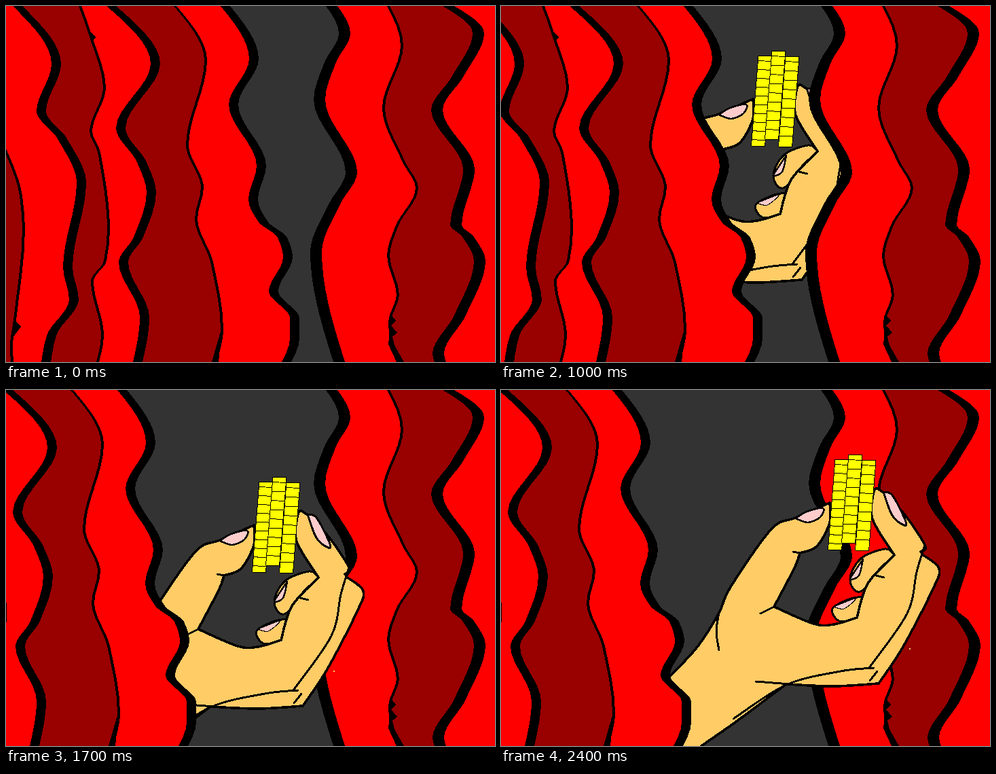
These frames come from a looping animation (720x524 px, 6 s). An HTML page:

```html
<!DOCTYPE html>
<html lang="en">
<head>
<meta charset="utf-8">
<title>Hand behind the curtain</title>
<style>
html, body { margin: 0; width: 100%; height: 100%; overflow: hidden; background: #333; }
svg { display: block; width: 100%; height: 100%; }
</style>
</head>
<body>
<svg id="stage" viewBox="0 0 720 524" shape-rendering="crispEdges"><g id="right"></g><g id="hand" stroke-linecap="round" stroke-linejoin="round"></g><g id="left"></g></svg>
<script>
const RED = '#f00', DARK = '#900', SKIN = '#fc6', PINK = '#fcc', YELLOW = '#ff0', BLACK = '#000';
const [stage, right, hand, left] = ['stage', 'right', 'hand', 'left'].map(id => document.getElementById(id));

function add(parent, d, fill, width = 0) {
  const p = document.createElementNS('http://www.w3.org/2000/svg', 'path');
  p.setAttribute('d', d);
  p.setAttribute('fill', fill || 'none');
  if (width) {
    p.setAttribute('stroke', BLACK);
    p.setAttribute('stroke-width', width);
  }
  parent.appendChild(p);
}

const points = text => text.split(',').map(s => s.trim().split(' ').map(Number));

// Smooth pen line through points
function curve(text) {
  const p = points(text);
  let d = 'M' + p[0];
  for (let i = 0; i < p.length - 1; i++) {
    const a = p[i - 1] || p[i], b = p[i], c = p[i + 1], e = p[i + 2] || c;
    const c1 = b.map((v, k) => v + (c[k] - a[k]) / 6);
    const c2 = c.map((v, k) => v - (e[k] - b[k]) / 6);
    d += 'C' + [c1, c2, c].join(' ');
  }
  return d;
}

// Hanging wave: x as a monotone spline of y, upright at every turning point
function wave(text, dx) {
  const p = points(text), n = p.length - 1;
  const s = p.slice(1).map(([x, y], i) => (x - p[i][0]) / (y - p[i][1]));
  const m = p.map((_, i) => s[i - 1] * s[i] > 0 ? 2 * s[i - 1] * s[i] / (s[i - 1] + s[i]) : 0);
  m[0] = 1.5 * s[0] - m[1] / 2;
  m[n] = 1.5 * s[n - 1] - m[n - 1] / 2;
  let d = `M${p[0][0] + dx} ${p[0][1]}`;
  for (let i = 0; i < n; i++) {
    const [x, y] = p[i], [X, Y] = p[i + 1], h = (Y - y) / 3;
    d += `C${x + dx + m[i] * h} ${y + h} ${X + dx - m[i + 1] * h} ${Y - h} ${X + dx} ${Y}`;
  }
  return d;
}

// Waves from the opening outwards: broad folds start red cloth, thin ones dark
function curtain(group, broad, waves) {
  const side = group === left ? -60 : 780;
  waves.forEach((w, i) => {
    const width = i % 2 ? 4 : broad, dx = i % 2 ? -2 : 0;
    const ink = group === left ? width : 0;
    const cover = shift => wave(w, dx + shift) + `L${side} 524L${side} 0Z`;
    add(group, cover(ink), BLACK);
    add(group, cover(width - ink), i % 2 ? DARK : RED);
  });
}

curtain(left, 14, [
  '316 0, 358 78, 328 145, 369 235, 357 285, 372 318, 400 341, 408 370, 387 420, 418 459, 418 489, 406 524',
  '249 0, 294 80, 267 205, 289 267, 280 313, 303 377, 318 475, 308 524',
  '148 0, 213 85, 162 180, 193 230, 207 275, 188 340, 166 377, 197 458, 187 524',
  '109 0, 126 48, 145 120, 125 185, 137 215, 151 330, 146 375, 127 405, 142 485, 135 524',
  '10 0, 67 85, 45 155, 75 194, 104 260, 84 385, 93 432, 60 485, 52 524',
  '-2 210, 22 280, 26 328, 13 462, 8 500, 9 524'
]);
curtain(right, 17, [
  '471 0, 490 40, 468 85, 453 138, 500 245, 475 292, 448 362, 482 524',
  '563 0, 583 58, 556 150, 585 228, 605 268, 575 325, 563 368, 577 425, 565 465, 567 487, 582 524',
  '643 0, 687 40, 657 103, 626 153, 673 240, 654 322, 672 340, 689 375, 660 455, 628 512, 631 524'
]);

// Ink snags on the thin waves
add(left, 'M121 34L132 46L126 52ZM14 464L22 472L10 488ZM318 472L313 524H303Z', BLACK);
add(right, 'M567 456L575 463L567 470L576 481L566 489L586 524H575L563 498Z', BLACK);

// Fingers tucked behind the index finger
add(hand, curve('578 241, 565 234, 530 248, 514 278, 528 297, 562 268'), SKIN, 3);
add(hand, curve('533 304, 512 308, 488 322, 498 340, 524 337'), SKIN, 3);

// Outline of hand and arm; each piece ends in a corner
const outline = [
  '484 166, 434 188, 398 205, 338 290, 321 328, 290 377, 249 421, 180 490',
  '250 558, 295 524, 345 489, 420 433',
  '420 433, 490 436, 556 432',
  '556 432, 592 378, 635 295, 645 263, 620 242',
  '618 238, 624 228, 590 178, 556 146, 548 152',
  '548 152, 547 190, 579 243',
  '579 243, 540 285, 524 335',
  '524 335, 490 345, 460 344, 402 319',
  '402 319, 432 262, 440 240',
  '440 240, 465 230, 484 195, 484 166'
].map(curve);
add(hand, outline.join('').replace(/(?!^)M/g, 'L') + 'Z', SKIN);
add(hand, outline.join(''), null, 3.6);

// Creases
for (const c of [
  '321 328, 317 355, 321 383',
  '440 240, 430 238',
  '402 319, 382 329',
  '624 228, 612 268, 598 329, 542 409',
  '375 429, 425 433',
  '342 484, 420 434, 500 414, 549 409',
  '543 428, 554 414',
  '552 273, 564 276'
]) add(hand, curve(c), null, 3);
add(hand, 'M601 380h2v2h-2z', SKIN);

// Nails
add(hand, curve('434 189, 450 179, 474 174, 470 187, 452 195, 434 189'), PINK, 2.6);
add(hand, curve('563 150, 577 156, 597 198, 577 186, 563 150'), PINK, 3);
add(hand, curve('533 249, 515 277, 527 273, 533 249'), PINK, 2.4);
add(hand, curve('490 319, 522 307, 505 322, 490 319'), PINK, 1.2);

// Leaning coin stack: a cut coin on top, then even ones
function stack(x, y, height, pitch) {
  const lean = -10.5;
  add(hand, `M${x} ${y}l20 1l${lean} ${height}l-20 -1z`, YELLOW, 1);
  let d = '';
  for (let v = 7.5; v < height - 6; v += pitch) d += `M${x + lean * v / height} ${y + v}l20 1`;
  add(hand, d, null, 1);
}
stack(492, 102, 133, 12.9);
stack(532, 103, 133, 13.7);
stack(512, 95, 130, 13.5);

// Time, x, y
const handKeys = [[0, -335, 67], [400, -205, -4], [800, -75, -75], [1200, -151, 16], [1500, -153, 43], [2400, 0, 0]];
const curtainKeys = [[0, 0, 0], [800, 0, 0], [1200, -95, 0], [1500, -152, 0], [2400, -152, 0]];

function move(el, keys, t) {
  const i = Math.max(1, keys.findIndex(k => k[0] >= t));
  const a = keys[i - 1], b = keys[i], u = (t - a[0]) / (b[0] - a[0]);
  const [x, y] = [1, 2].map(k => Math.round(a[k] + (b[k] - a[k]) * u));
  el.setAttribute('transform', `translate(${x} ${y})`);
}

function draw(ms) {
  const t = Math.min(2400, Math.floor(ms % 6000 / 100) * 100);
  move(hand, handKeys, t);
  move(left, curtainKeys, t);
  // The hand comes out in front of the right curtain
  const above = t < 1300 ? right : left;
  if (hand.nextElementSibling !== above) stage.insertBefore(hand, above);
}

const start = performance.now();
function tick() {
  draw(performance.now() - start);
  requestAnimationFrame(tick);
}
tick();
</script>
</body>
</html>
```
